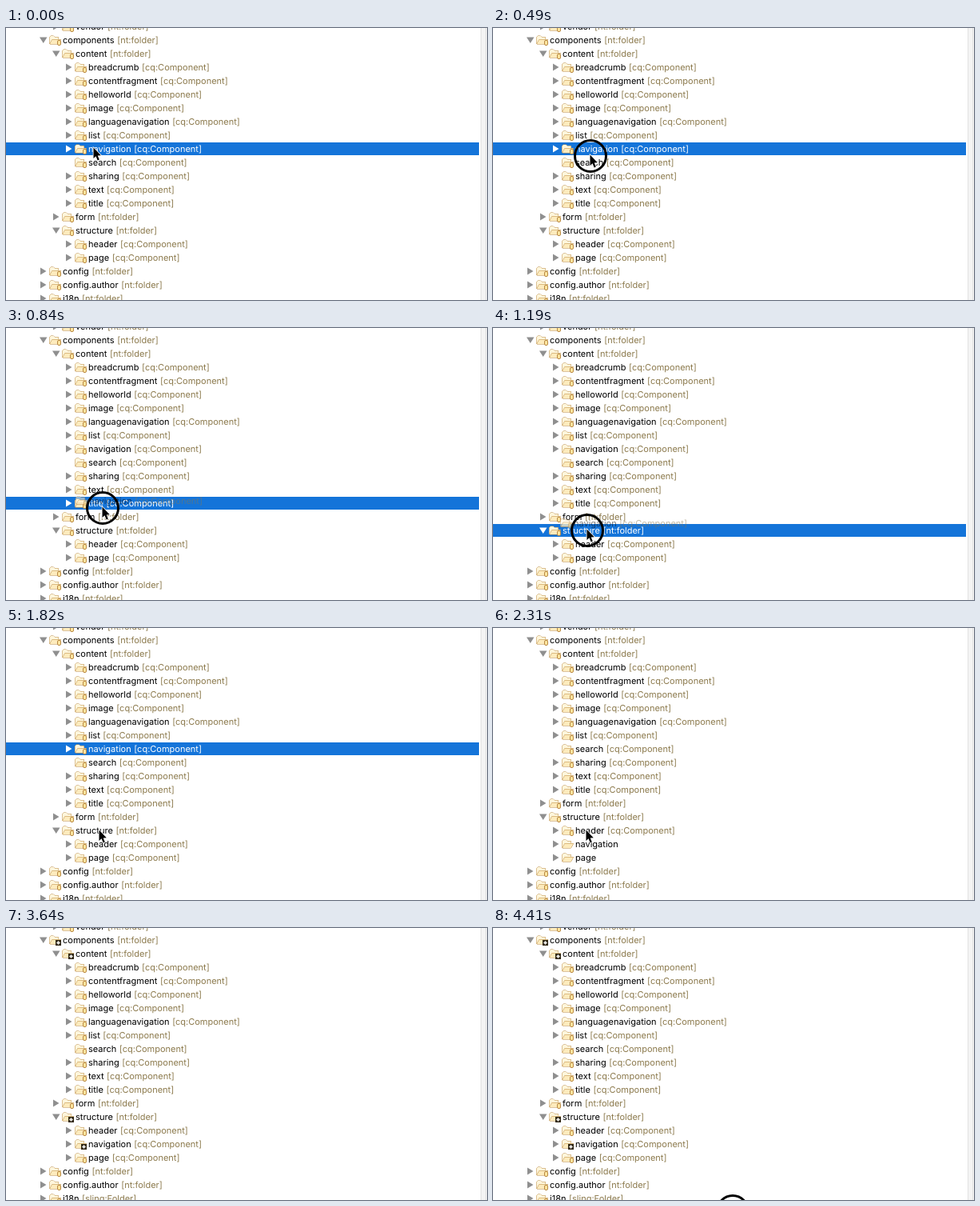
An HTML page with a canvas that plays this animation: 602x340 px, repeating every 4480 ms.

```html
<!DOCTYPE html>
<html lang="en">
<head>
<meta charset="utf-8">
<title>Moving a folder in a project tree</title>
<style>
  html, body { margin: 0; width: 100%; height: 100%; overflow: hidden; background: #fff; }
  canvas { display: block; }
</style>
</head>
<body>
<canvas id="stage" width="602" height="340"></canvas>
<script>
const ctx = document.getElementById('stage').getContext('2d');
const LOOP = 4480, STEP = 70, ROW = 17, FIRST_ROW_Y = -2;
const TIME = { drag: 630, drop: 1680, refresh: 2030, retype: 2380, badges: 2590, restore: 3430, sling: 3640 };
const COMPONENT = '[cq:Component]', FOLDER = '[nt:folder]';
const LEAVES = ['breadcrumb', 'contentfragment', 'helloworld', 'image', 'languagenavigation',
  'list', 'navigation', 'search', 'sharing', 'text', 'title'];

// time, x, y of the pointer tip
const POINTER = [
  [0, 109, 149], [140, 109, 149], [350, 120, 157], [560, 121, 158], [700, 121, 193],
  [840, 120, 223], [1190, 117, 251], [2310, 116, 252], [2520, 116, 252],
  [2800, 137, 259], [3150, 137, 259], [3640, 292, 352], [LOOP, 299, 352]
];

function pointerAt(t) {
  const i = POINTER.findIndex(key => key[0] > t);
  const [t0, x0, y0] = POINTER[i - 1], [t1, x1, y1] = POINTER[i];
  const k = (t - t0) / (t1 - t0);
  return { x: Math.round(x0 + (x1 - x0) * k), y: Math.round(y0 + (y1 - y0) * k) };
}

function polygon(points, fill, stroke, lineWidth = 1) {
  ctx.beginPath();
  points.forEach(([x, y]) => ctx.lineTo(x, y));
  ctx.closePath();
  if (stroke) {
    ctx.strokeStyle = stroke;
    ctx.lineWidth = lineWidth;
    ctx.stroke();
  }
  if (fill) {
    ctx.fillStyle = fill;
    ctx.fill();
  }
}

function treeRows(t) {
  const moved = t >= TIME.refresh, retyped = t >= TIME.retype, badge = t >= TIME.badges;
  const leafType = retyped && t < TIME.restore ? FOLDER : COMPONENT;
  const leaf = name => ({
    depth: 2, name, arrow: name === 'search' ? '' : 'right',
    type: name === 'search' ? COMPONENT : leafType, barrel: true
  });
  const folder = (depth, name, arrow = 'right', badged = false) =>
    ({ depth, name, arrow, type: FOLDER, barrel: true, badge: badged });
  // Nodes that are still being refreshed have neither type nor decoration.
  const refreshed = (name, ready, badged = false) =>
    ({ depth: 2, name, arrow: 'right', type: ready ? COMPONENT : '', barrel: ready, badge: badged });
  return [
    folder(1, 'vendor'),
    folder(0, 'components', 'down', badge),
    folder(1, 'content', 'down', badge),
    ...LEAVES.filter(name => !moved || name !== 'navigation').map(leaf),
    folder(1, 'form'),
    folder(1, 'structure', 'down', badge),
    leaf('header'),
    ...(moved ? [refreshed('navigation', retyped, badge)] : []),
    refreshed('page', !moved || retyped),
    folder(0, 'config'),
    folder(0, 'config.author'),
    { ...folder(0, 'i18n'), type: t >= TIME.sling ? '[sling:Folder]' : FOLDER }
  ];
}

function drawArrow(x, y, direction, color) {
  if (direction === 'right') polygon([[x, y - 4.5], [x + 7.5, y], [x, y + 4.5]], color);
  if (direction === 'down') polygon([[x - 1, y - 3.5], [x + 8.5, y - 3.5], [x + 3.75, y + 4]], color);
}

function drawIcon(x, y, { barrel, badge }) {
  const edge = '#b98a45';
  polygon([[x + .5, y + 4.5], [x + .5, y - 3.5], [x + 2, y - 5], [x + 5.5, y - 5], [x + 7, y - 3.5],
    [x + 11.5, y - 3.5], [x + 11.5, y + 4.5]], '#fff6dc', edge);
  polygon([[x + 1, y + 5], [x + 3.8, y - .5], [x + 14.5, y - .5], [x + 11.5, y + 5]], '#fdebbd', edge);
  if (badge) {
    ctx.fillStyle = '#2d2410';
    ctx.fillRect(x + 8, y, 7, 7);
    ctx.strokeStyle = '#fff';
    ctx.lineWidth = .8;
    ctx.beginPath();
    for (const [dx, dy] of [[2.5, 0], [0, 2.5], [1.7, 1.7], [1.7, -1.7]]) {
      ctx.moveTo(x + 11.5 - dx, y + 3.5 - dy);
      ctx.lineTo(x + 11.5 + dx, y + 3.5 + dy);
    }
    ctx.stroke();
  } else if (barrel) {
    ctx.beginPath();
    ctx.roundRect(x + 10.5, y + .5, 4, 6, 1.5);
    ctx.fillStyle = '#ffe6a0';
    ctx.fill();
    ctx.strokeStyle = '#b98a45';
    ctx.lineWidth = 1;
    ctx.stroke();
  }
}

function drawEntry(row, x, y, selected) {
  drawIcon(x - 17, y, row);
  ctx.font = '11px Inter, Roboto, sans-serif';
  ctx.textRendering = 'geometricPrecision';
  ctx.fillStyle = selected ? '#fff' : '#000';
  ctx.fillText(row.name, x, y + 4);
  ctx.fillStyle = selected ? '#fff' : '#8c7a4d';
  ctx.fillText(row.type, x + ctx.measureText(row.name + ' ').width + .5, y + 4);
}

function drawRing(x, y) {
  ctx.strokeStyle = '#000';
  ctx.lineWidth = 3;
  ctx.beginPath();
  ctx.arc(x, y, 19.5, 0, Math.PI * 2);
  ctx.stroke();
}

function drawPointer(x, y) {
  const shape = [[0, 0], [0, 13.5], [3, 10.8], [5.2, 16], [7.3, 15], [5.2, 10], [9.3, 9.7]];
  polygon(shape.map(([dx, dy]) => [x + dx + .5, y + dy + .5]), '#000', '#fff', 1.5);
}

function drawScrollTrack() {
  ctx.fillStyle = '#f4f4f4';
  ctx.fillRect(594, 0, 8, 340);
  ctx.fillStyle = '#e2e2e2';
  ctx.fillRect(594, 0, 1, 340);
  ctx.fillRect(600, 0, 1, 340);
}

function draw(t) {
  const pointer = pointerAt(t), rows = treeRows(t);
  const dragging = t >= TIME.drag && t < TIME.drop;
  const hovered = Math.floor((pointer.y - FIRST_ROW_Y + 8) / ROW);
  const selected = dragging ? hovered
    : t < TIME.refresh ? rows.findIndex(row => row.name === 'navigation') : -1;

  ctx.fillStyle = '#fff';
  ctx.fillRect(0, 0, 602, 340);
  drawScrollTrack();
  rows.forEach((row, i) => {
    const x = 71 + row.depth * 16, y = FIRST_ROW_Y + i * ROW, active = i === selected;
    if (active) {
      ctx.fillStyle = '#1474d9';
      ctx.fillRect(0, y - 8, 592, 16);
    }
    drawArrow(x - 28, y, row.arrow, active ? '#fff' : '#8f8f8f');
    drawEntry(row, x, y, active);
  });

  if (dragging) {
    ctx.globalAlpha = .5;
    drawEntry({ name: 'navigation', type: COMPONENT, barrel: true }, pointer.x - 16, pointer.y - 7.5);
    ctx.globalAlpha = 1;
  }
  if (t >= 350 && t < TIME.drop) drawRing(pointer.x + 1, pointer.y + 2);
  if (t >= 4410) drawRing(300, 354);
  drawPointer(pointer.x, pointer.y);
}

function frame() {
  draw(Math.floor(performance.now() % LOOP / STEP) * STEP);
  requestAnimationFrame(frame);
}
frame();
</script>
</body>
</html>
```
